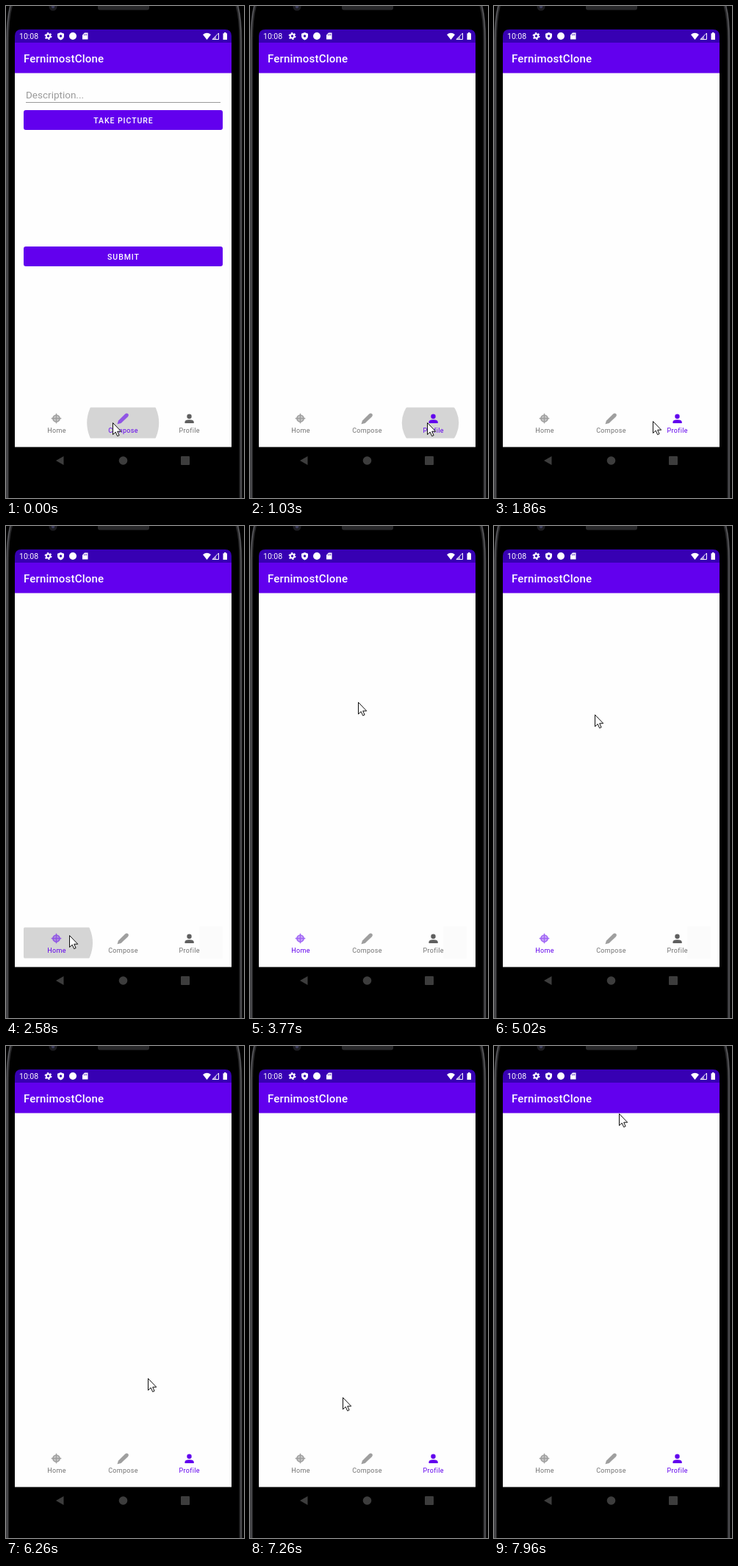
An HTML page for the animation above (8 s loop, 324x671 px).

```html
<!DOCTYPE html>
<html lang="en">
<head>
<meta charset="utf-8">
<title>Phone app tabs</title>
<style>
  html, body { margin: 0; width: 100%; height: 100%; overflow: hidden; background: #000; }
  svg { display: block; width: 100%; height: 100%; font-family: Roboto, sans-serif; }
  .button rect { fill: #6200ee; }
  .button text { fill: #fff; font-size: 10.5px; font-weight: 500; letter-spacing: .94px; text-anchor: middle; }
  .tab { color: #5f5f5f; fill: currentColor; }
  .tab text { font-size: 9px; letter-spacing: .3px; text-anchor: middle; fill: #727272; }
  .tab.on { color: #6200ee; }
  .tab.on text { fill: #6200ee; }
  .soft { opacity: .6; }
</style>
</head>
<body>
<svg viewBox="0 0 324 671">
  <defs>
    <clipPath id="bar"><rect x="24" y="547.5" width="271" height="42"/></clipPath>
    <clipPath id="list"><rect x="30" y="110" width="259" height="431"/></clipPath>
    <g id="edge" fill="none">
      <path d="M8 -4Q2 14 2 48V675" stroke="#2b2b2d" stroke-width="4"/>
      <path d="M7 -4Q1.500 14 1.500 48V675" stroke="#5e5e62" stroke-width="1.300"/>
    </g>
  </defs>

  <!-- phone body -->
  <rect width="324" height="671"/>
  <use href="#edge"/>
  <use href="#edge" transform="matrix(-1 0 0 1 321.500 0)"/>
  <rect x="125" y="-6" width="70" height="11.500" rx="3" fill="#29292b"/>
  <circle cx="64" cy="1" r="5.500" fill="#1d1d21"/>
  <circle cx="64" cy="1" r="2.200" fill="#3b3b58"/>
  <g fill="#3d3d3d">
    <path d="M68 620L78.500 614V626Z"/>
    <circle cx="159.500" cy="620" r="5.800"/>
    <rect x="238" y="614" width="12" height="12" rx="1"/>
  </g>

  <!-- screen -->
  <rect x="12" y="60" width="295" height="541.500" fill="#fefefe"/>
  <path d="M12 50V41Q12 32 21 32H298Q307 32 307 41V50Z" fill="#3700b3"/>
  <rect x="12" y="50" width="295" height="41.500" fill="#6200ee"/>
  <text x="24" y="77" fill="#fff" font-size="15" font-weight="500" letter-spacing=".19">FernimostClone</text>

  <!-- status bar -->
  <g fill="#fff">
    <text x="18" y="45" font-size="10.500">10:08</text>
    <circle cx="57.500" cy="41" r="2.700" fill="none" stroke="#fff" stroke-width="2"/>
    <circle cx="57.500" cy="41" r="4.200" fill="none" stroke="#fff" stroke-width="1.600" stroke-dasharray="2.200 2.200"/>
    <path d="M74.500 36L79 37.800V41Q79 44.500 74.500 46.500Q70 44.500 70 41V37.800Z"/>
    <circle cx="74.500" cy="41" r="1.700" fill="#3700b3"/>
    <circle cx="91" cy="41" r="5"/>
    <path d="M107 36.500H111.500V45.500H104V39.500Z"/>
    <path d="M106.300 38.500v1.800M108 38v2.300M109.700 38v2.300" stroke="#3700b3" stroke-width=".7"/>
    <path d="M268 39Q273.500 34.500 279 39L273.500 46Z"/>
    <path d="M281 45.500L289.500 37V45.500Z" fill="none" stroke="#fff"/>
    <path d="M281 45.500L286 40.500V45.500Z" opacity=".55"/>
    <path d="M295.500 37.200H297V36H299.500V37.200H301V46H295.500Z"/>
  </g>

  <g id="form">
    <text x="27" y="126" font-size="13.500" fill="#9a9a9a">Description...</text>
    <path d="M27 131.500H292" stroke="#999"/>
    <g class="button">
      <rect x="24" y="142" width="271" height="27" rx="3"/>
      <text x="160" y="159.700">TAKE PICTURE</text>
      <rect x="24" y="328" width="271" height="27" rx="3"/>
      <text x="160" y="345.700">SUBMIT</text>
    </g>
  </g>

  <g clip-path="url(#list)" fill="#6200ee">
    <ellipse id="topGlow" cx="159.500" cy="110" rx="130"/>
    <ellipse id="endGlow" cx="159.500" cy="541" rx="130"/>
  </g>

  <!-- tabs -->
  <rect id="tint" x="263" y="546" width="32" height="44" fill="#fbfbfb"/>
  <circle id="ripple" cy="568.500" fill="#d5d5d5" clip-path="url(#bar)"/>
  <g class="tab">
    <g class="soft" stroke="currentColor">
      <circle cx="68.500" cy="562.500" r="4.500" fill-opacity=".55" stroke-width="1.700"/>
      <path d="M68.500 555.700V569.300M61.700 562.500H75.300" stroke-width="1.400"/>
    </g>
    <text x="69" y="582">Home</text>
  </g>
  <g class="tab">
    <path class="soft" d="M151.500 570.300L153 565.600 161.800 556.700Q164.300 554.500 166.200 556.300 167.800 558 165.600 560.500L156.600 569Z"/>
    <text x="159.500" y="582">Compose</text>
  </g>
  <g class="tab">
    <circle cx="249.500" cy="559.700" r="3.200"/>
    <path d="M243.500 569V567.200Q243.500 564.400 249.500 564.200 255.700 564.400 255.700 567.200V569Z"/>
    <text x="249.700" y="582">Profile</text>
  </g>

  <path id="cursor" d="M.5 .5V16.500L4.200 13.100 6.700 18.600 9.100 17.500 6.700 12.200H11.700Z" fill="#fff" stroke="#000" stroke-width=".95"/>
</svg>

<script>
const LOOP = 8000, MOVE = 400, GROW = 225, HOLD = 400, FADE = 270;
const $ = id => document.getElementById(id);
const tabs = document.querySelectorAll('.tab');
const clamp = v => Math.max(0, Math.min(1, v));
const mix = (a, b, p) => a + (b - a) * p;
const ease = p => p * p * (3 - 2 * p);

// pointer stops: arrival time, x, y
const stops = [
  [0, 145, 568], [570, 241, 568], [2160, 86, 558], [3120, 148, 250], [3770, 147, 240],
  [4320, 142, 246], [5020, 137, 257], [5550, 240, 566], [6010, 207, 472],
  [6260, 193, 453], [6560, 177, 446], [6960, 126, 479], [7960, 170, 92]
];

// tab presses: time, tab
const presses = [[-250, 1], [911, 2], [2330, 0], [5340, 2]];

// rests at each stop, then leaves in time to reach the next
function pointer(t) {
  const i = Math.max(1, stops.findIndex(s => s[0] >= t));
  const [t0, x0, y0] = stops[i - 1];
  const [t1, x1, y1] = t > LOOP - 40 ? stops.at(-1) : stops[i];
  const p = ease(clamp(1 - (t1 - t) / Math.min(MOVE, t1 - t0)));
  return t >= stops.at(-1)[0] ? [x1, y1] : [mix(x0, x1, p), mix(y0, y1, p)];
}

function set(id, attrs) {
  for (const k in attrs) $(id).setAttribute(k, attrs[k]);
}

function glow(id, t, start, end) {
  const p = Math.sin(Math.PI * clamp((t - start) / (end - start)));
  set(id, { ry: 16 * p, opacity: .12 * p });
}

function draw() {
  const t = performance.now() % LOOP;

  const [x, y] = pointer(t);
  set('cursor', { transform: `translate(${Math.round(x)} ${Math.round(y)})` });

  const [down, tab] = presses.findLast(p => p[0] <= t);
  const grow = clamp((t - down) / GROW);
  set('ripple', {
    cx: mix(pointer(Math.max(0, down))[0], 69 + 90.2 * tab, grow),
    r: mix(27, 49, grow),
    opacity: 1 - clamp((t - down - HOLD) / FADE)
  });

  const active = presses.findLast(p => p[0] + 100 <= t)[1];
  tabs.forEach((el, i) => el.classList.toggle('on', i === active));
  set('form', { visibility: active === 1 ? 'visible' : 'hidden' });
  set('tint', { opacity: +(active === 0) });

  glow('topGlow', t, 3800, 4320);
  glow('endGlow', t, 7300, 7960);
  requestAnimationFrame(draw);
}
draw();
</script>
</body>
</html>
```
